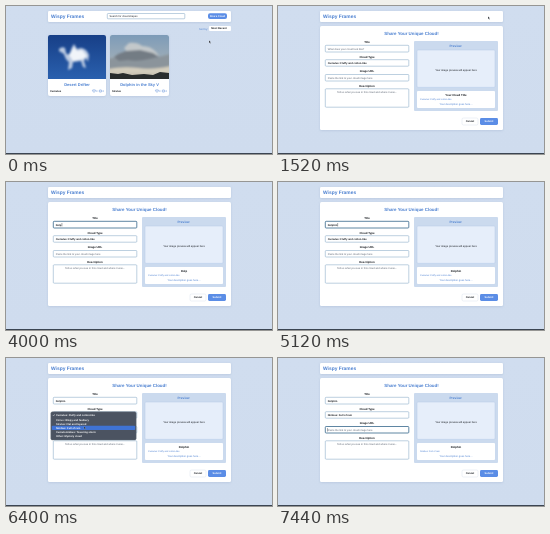
These frames come from a looping animation (266x148 px, 8000 ms). An HTML page:

```html
<!DOCTYPE html>
<html lang="en">
<head>
<meta charset="utf-8">
<title>Cloud gallery</title>
<style>
html, body { margin: 0; width: 100%; height: 100%; overflow: hidden; background: #d0ddef; }
svg { display: block; width: 100vw; height: 100vh; }
text { font: 2.6px "Liberation Sans", Arial, sans-serif; fill: #12161c; text-rendering: geometricPrecision; }
.mid { text-anchor: middle; }
.bold { font-weight: bold; }
.blue { fill: #4a7fd0; }
.soft { fill: #596270; }
.white { fill: #fff; }
.brand { font-size: 4.9px; }
.heading { font-size: 4.42px; }
.card-title { font-size: 4px; }
.label { font-size: 2.8px; font-weight: bold; fill: #0c1016; }
.field { fill: #fff; stroke: #86a9c6; stroke-width: .55; }
.field.focus { stroke: #37678c; stroke-width: .8; }
.button { fill: #5b8de6; }
.icon { fill: none; stroke: #4a7fd0; stroke-width: .5; }
</style>
</head>
<body>
<svg viewBox="0 0 266 148" preserveAspectRatio="none">
  <defs>
    <linearGradient id="page" x2="0" y2="1"><stop stop-color="#d0ddef"/><stop offset="1" stop-color="#cfdcee"/></linearGradient>
    <linearGradient id="blueSky" x2="0" y2="1"><stop stop-color="#173f87"/><stop offset="1" stop-color="#2a60ae"/></linearGradient>
    <linearGradient id="greySky" x2="0" y2="1"><stop stop-color="#7d9bb8"/><stop offset=".5" stop-color="#9aabb8"/><stop offset=".85" stop-color="#c9c3b2"/></linearGradient>
    <filter id="shadow" x="-10%" y="-10%" width="120%" height="125%"><feDropShadow dx="0" dy=".6" stdDeviation=".8" flood-color="#6783aa" flood-opacity=".25"/></filter>
    <filter id="blur" x="-10%" y="-10%" width="120%" height="120%"><feGaussianBlur stdDeviation=".8"/></filter>
    <clipPath id="photo1"><path d="M42 73V31q0-2 2-2h54q2 0 2 2v42z"/></clipPath>
    <clipPath id="photo2"><path d="M104 73V31q0-2 2-2h55q2 0 2 2v42z"/></clipPath>
  </defs>
  <rect width="266" height="148" fill="url(#page)"/>
  <rect y="147" width="266" height="1" fill="#3b4552"/>
  <rect x="42" y="5" width="183" height="11" rx="1.2" fill="#fff" filter="url(#shadow)"/>
  <text class="brand bold blue" x="45" y="12.2">Wispy Frames</text>

  <g id="gallery">
    <rect class="field" x="101.3" y="7.5" width="77.5" height="5.3" rx=".8"/>
    <text x="103.5" y="11.1">Search for cloud shapes</text>
    <rect id="share" class="button" x="202" y="7.3" width="19" height="5.8" rx="2"/>
    <text class="mid white bold" x="211.5" y="11.1">Share Cloud</text>
    <text class="blue" x="193" y="23.6">Sort by:</text>
    <rect x="203" y="20" width="22" height="5" rx="1" fill="#fff"/>
    <text class="bold" x="205.2" y="23.4">Most Recent</text>

    <g filter="url(#shadow)" fill="#fff">
      <rect x="42" y="29" width="58" height="61" rx="2"/>
      <rect x="104" y="29" width="59" height="61" rx="2"/>
    </g>
    <g clip-path="url(#photo1)">
      <rect x="42" y="29" width="58" height="44" fill="url(#blueSky)"/>
      <g filter="url(#blur)">
        <path fill="#bccbe2" d="M53 43q3-3 6-1l1 5q2 3 4 0 1-5 4-9l3 5 4-1q6 1 8 7l-1 7-2-4-2 3 2 7-3-1-2-6-8 1-1 6-4 2 1-8q-4-3-5-8l-5-3z"/>
        <path fill="#f0f4f9" d="M63 49l5-8 3 4 5-1 5 6-4 3-10 2z"/>
      </g>
    </g>
    <g clip-path="url(#photo2)">
      <rect x="104" y="29" width="59" height="44" fill="url(#greySky)"/>
      <g filter="url(#blur)">
        <path fill="#8b949b" d="M102 53q12-4 25-1t37-4v13q-20 5-35 2t-27 2z"/>
        <path fill="#d4cebd" d="M102 63q16-3 30-1t33-2v7h-63z"/>
        <path fill="#c3c8ca" d="M118 42l5-5q8-1 13 3 9 0 14 6l3 4-14-3-16 1z"/>
        <path fill="#737c84" d="M108 51q5-4 12-6l14-1 13 3 6 4-10 2q-12 3-21 1l-9 1z"/>
      </g>
      <path fill="#292d2d" d="M104 67l8 1 5-1 9 2 12-1 9 1 7-3 9 1v6h-59z"/>
    </g>
    <text class="card-title mid bold blue" x="71" y="79.7">Desert Drifter</text>
    <text class="card-title mid bold blue" x="133.5" y="79.7">Dolphin in the Sky V</text>
    <text class="bold" x="44" y="86.2">Cumulus</text>
    <text class="bold" x="106" y="86.2">Stratus</text>
    <g id="counts">
      <path class="icon" d="M88 86.4l-1.5-1.5q-.1-1.7 1.5-.8 1.6-.9 1.5.8z"/>
      <text class="blue" x="90" y="86.3">3</text>
      <rect class="icon" x="93.3" y="84" width="2.3" height="2" rx=".5"/>
      <text class="blue" x="96.5" y="86.3">2</text>
    </g>
    <use href="#counts" x="63"/>
  </g>

  <g id="editor">
    <rect x="42" y="20" width="183" height="104" rx="1.5" fill="#fff" filter="url(#shadow)"/>
    <text class="heading mid bold blue" x="133.5" y="28.6">Share Your Unique Cloud!</text>

    <text class="label mid" x="89" y="37">Title</text>
    <rect id="titleField" class="field" x="47.3" y="39.3" width="83.5" height="6.7" rx=".8"/>
    <text id="titleText" x="49.7" y="43.6"></text>
    <text class="label mid" x="89" y="51.7">Cloud Type</text>
    <rect class="field" x="47.3" y="53.7" width="83.5" height="6.5" rx=".8"/>
    <text id="typeText" class="bold" x="49.7" y="58"></text>
    <text class="label mid" x="89" y="66.4">Image URL</text>
    <rect id="urlField" class="field" x="47.3" y="68.5" width="83.5" height="6.5" rx=".8"/>
    <text class="soft" x="49.7" y="72.7">Paste the link to your cloud image here</text>
    <text class="label mid" x="89" y="81">Description</text>
    <rect class="field" x="47.3" y="82.8" width="83.5" height="18.4" rx=".8"/>
    <text class="mid soft" x="89" y="87.1">Tell us what you see in this cloud and where it was...</text>
    <rect id="caret" width=".4" height="3.4" fill="#20262e"/>

    <rect x="136" y="35" width="84" height="70" rx="1" fill="#cbdaee"/>
    <text class="mid bold blue" x="177.5" y="41" style="font-size:3.2px">Preview</text>
    <rect x="139" y="44" width="78" height="37.3" rx="1" fill="#e6eefa" stroke="#b7cbe7" stroke-width=".5"/>
    <text class="mid" x="178" y="64.8">Your image preview will appear here</text>
    <rect x="139" y="85" width="78" height="17" rx="1" fill="#fff"/>
    <text id="previewTitle" class="label mid" x="178" y="90.2"></text>
    <text id="previewType" class="blue" x="142" y="94.3" style="font-size:2.3px"></text>
    <text class="mid blue" x="178" y="99.3">Your description goes here...</text>

    <rect x="184" y="112" width="16" height="7" rx="1.4" fill="#fff" stroke="#dbe3ed" stroke-width=".5"/>
    <text class="mid bold" x="192" y="116.4">Cancel</text>
    <rect class="button" x="202" y="112" width="18" height="7" rx="1.4"/>
    <text class="mid white bold" x="211" y="116.4">Submit</text>
  </g>

  <g id="menu">
    <rect x="44.8" y="53.8" width="85.4" height="28.2" rx="1.6" fill="#4b5361" stroke="#69717d" stroke-width=".4"/>
    <rect id="highlight" x="45.8" width="83.4" height="4.2" rx=".8" fill="#3f73d5"/>
    <path d="M47 57.2l.6.8 1-1.8" fill="none" stroke="#fff" stroke-width=".4"/>
  </g>
  <path id="pointer" d="M0 0v2.5l.6-.5.5 1 .5-.2-.5-1h.8z" fill="#171b21" stroke="#fff" stroke-width=".15"/>
</svg>
<script>
const LOOP = 8000;
const byId = id => document.getElementById(id);
const cloudTypes = [
  "Cumulus: Fluffy and cotton-like", "Cirrus: Wispy and feathery", "Stratus: Flat and layered",
  "Nimbus: Full of rain", "Cumulonimbus: Towering storm", "Other: Mystery cloud"
];
const chosenType = 3;
const rowY = row => 55.5 + row * 4.1;

cloudTypes.forEach((name, row) => {
  const item = document.createElementNS("http://www.w3.org/2000/svg", "text");
  item.setAttribute("x", 50);
  item.setAttribute("y", rowY(row) + 2.9);
  item.setAttribute("class", "white bold");
  item.textContent = name;
  byId("menu").append(item);
});

// Each step is [start time, value]; the latest reached step applies.
const stepAt = (steps, time) => steps.filter(([start]) => time >= start).pop()[1];
const typedSteps = [[0, 0], [3120, 1], [3680, 2], [4000, 4], [4800, 6], [5120, 7]];
const menuSteps = [[0, 0], [6160, 1], [6880, .75], [6960, .5], [7040, .25], [7120, 0]];
const rowSteps = [[0, 0], [6320, 2], [6400, chosenType]];
const pointerSteps = [
  [0, [203, 34.5]], [1440, [210, 10.5]], [3120, null],
  [6160, [77, 57]], [6320, [78, 64]], [6400, [78, 68.5]], [7120, null]
];

function show(id, visible) {
  byId(id).style.display = visible ? "" : "none";
}

function render(time) {
  const typed = "Dolphin".slice(0, stepAt(typedSteps, time));
  const type = cloudTypes[time < 6880 ? 0 : chosenType];
  const editing = time >= 1520;
  const urlFocused = time >= 7440;
  const titleFocused = time >= 3120 && time < 6160;
  const pointer = stepAt(pointerSteps, time);

  show("gallery", !editing);
  show("editor", editing);
  byId("share").style.fill = time >= 1440 ? "#79a1e2" : "";

  const title = byId("titleText");
  title.textContent = typed || "What does your cloud look like?";
  title.setAttribute("class", typed ? "bold" : "soft");
  byId("previewTitle").textContent = typed || "Your Cloud Title";
  byId("typeText").textContent = type;
  byId("previewType").textContent = type;
  byId("titleField").classList.toggle("focus", titleFocused);
  byId("urlField").classList.toggle("focus", urlFocused);

  show("caret", titleFocused || urlFocused);
  const caretX = urlFocused ? 49.3 : 50 + (editing ? title.getComputedTextLength() : 0);
  byId("caret").setAttribute("x", caretX);
  byId("caret").setAttribute("y", urlFocused ? 70.1 : 41);

  byId("menu").style.opacity = stepAt(menuSteps, time);
  byId("highlight").setAttribute("y", rowY(stepAt(rowSteps, time)));
  show("pointer", pointer);
  if (pointer) byId("pointer").setAttribute("transform", `translate(${pointer})`);
}

const startTime = performance.now();
function tick() {
  render((performance.now() - startTime) % LOOP);
  requestAnimationFrame(tick);
}
tick();
</script>
</body>
</html>
```
